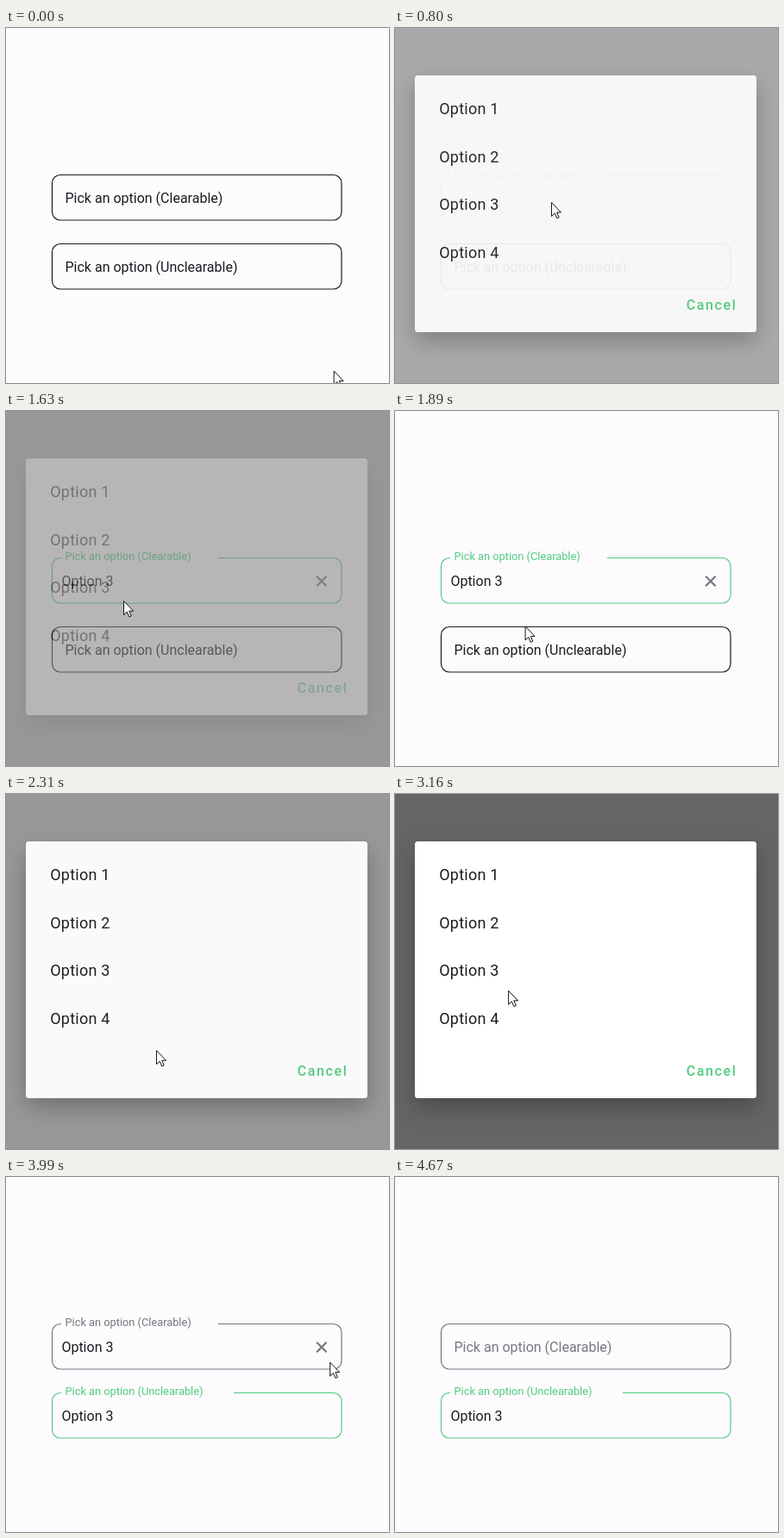
Recreate the animation shown at these times as an HTML page. Size 444x412 px, loop 5.4 s.

```html
<!DOCTYPE html>
<html lang="en">
<head>
<meta charset="utf-8">
<title>Select fields</title>
<style>
  html, body { margin: 0; width: 100%; height: 100%; overflow: hidden; background: #fefbff; }
  svg { display: block; width: 444px; height: 412px; font: 16px Roboto, sans-serif; fill: #1c1b1f; }
  .outline { fill: none; stroke-width: 1.2; }
  .gap { fill: #fefbff; }
  .cross { stroke: #79767c; stroke-width: 2.2; }
  .panel { fill: #fff; filter: drop-shadow(0 11px 13px rgba(0, 0, 0, .26)); }
  .option { font-size: 18px; letter-spacing: .25px; }
  .cancel { font-weight: 500; letter-spacing: 1.6px; fill: #50cc80; }
  .cursor { fill: #fff; stroke: #111; stroke-width: 1; }
</style>
</head>
<body>
<svg viewBox="0 0 444 412">
  <g id="fields"></g>
  <rect id="shade" width="444" height="412" fill="#000"/>
  <g id="dialog">
    <rect class="panel" x="23" y="55" width="396" height="298" rx="3.5"/>
    <text class="cancel" x="337.7" y="326.5">Cancel</text>
  </g>
  <path id="cursor" class="cursor" d="M.5 .5V16.5L4.2 13 6.8 18.8 9.2 17.7 6.7 12H11.5Z"/>
</svg>
<script>
const LOOP = 5400, FADE = 152;
const DARK = '#1c1b1f', GREEN = '#50cc80', GREY = '#79767c';
const OPEN1 = 717, PICK1 = 1580, OPEN2 = 2210, PICK2 = 3163, CLEAR = 4340, LEAVE = 4670;
const FOCUS1 = OPEN1 - 50, FOCUS2 = OPEN2 - 50;
const $ = id => document.getElementById(id);

function add(parent, tag, attrs, text = '') {
  const el = document.createElementNS('http://www.w3.org/2000/svg', tag);
  for (const k in attrs) el.setAttribute(k, attrs[k]);
  el.textContent = text;
  parent.append(el);
  return el;
}

function makeField(y, title, width) {
  const g = add($('fields'), 'g', { transform: `translate(0 ${y})` });
  return {
    outline: add(g, 'rect', { class: 'outline', x: 53.5, y: .5, width: 335.5, height: 52.5, rx: 9.5 }),
    gap: add(g, 'rect', { class: 'gap', x: 64, y: -2, width, height: 5 }),
    label: add(g, 'text', {}, title),
    value: add(g, 'text', { x: 64.4, y: 33 }, 'Option 3'),
    cross: add(g, 'path', { class: 'cross', d: 'M360.2 21.8l11.4 11.4m0-11.4l-11.4 11.4' })
  };
}

const first = makeField(170, 'Pick an option (Clearable)', 182);
const second = makeField(250, 'Pick an option (Unclearable)', 200);
for (let i = 0; i < 4; i++)
  add($('dialog'), 'text', { class: 'option', x: 51.2, y: 100 + i * 55.7 }, 'Option ' + (i + 1));

const ramp = (t, start, length) => Math.min(1, Math.max(0, (t - start) / length));
const smooth = p => p * p * (3 - 2 * p);
const float = (t, start) => smooth(ramp(t, start, FADE));
const show = (el, on) => el.setAttribute('visibility', on ? 'visible' : 'hidden');

function drawField(f, color, lift, filled, clearable) {
  f.outline.setAttribute('stroke', color);
  f.label.setAttribute('fill', color);
  f.label.setAttribute('transform', `translate(68.5 ${33 - 30 * lift}) scale(${1 - .2 * lift})`);
  show(f.gap, lift > 0);
  show(f.value, filled);
  show(f.cross, filled && clearable);
}

function drawDialog(t) {
  const [open, close] = t < FOCUS2 ? [OPEN1, PICK1] : [OPEN2, PICK2];
  const closing = t >= close;
  const p = closing ? 1 - ramp(t, close, FADE) : ramp(t, open, FADE);
  $('shade').setAttribute('opacity', .6 * p);
  $('dialog').setAttribute('opacity', closing ? p ** 3 : 1 - (1 - p) ** 3);
}

// turning points of the pointer: time, x, y
const turns = [
  [0, 380, 398], [600, 170, 191], [800, 181, 202], [1630, 136, 220],
  [2310, 174, 297], [2450, 173, 327], [3010, 89, 194], [3160, 130, 227],
  [3300, 286, 342], [3650, 388, 248], [4130, 370, 201], [CLEAR, 370, 201], [LEAVE, 391, 340]
];

function drawCursor(t) {
  show($('cursor'), t < LEAVE);
  if (t >= LEAVE) return;
  const i = turns.findIndex(k => k[0] > t);
  const [t0, x0, y0] = turns[i - 1], [t1, x1, y1] = turns[i];
  const p = ramp(t, t0, t1 - t0);
  $('cursor').setAttribute('transform', `translate(${x0 + (x1 - x0) * p} ${y0 + (y1 - y0) * p})`);
}

function draw(t) {
  drawField(first, t < FOCUS1 ? DARK : t < FOCUS2 ? GREEN : GREY,
    float(t, FOCUS1) - float(t, CLEAR), t >= PICK1 && t < CLEAR, true);
  drawField(second, t < FOCUS2 ? DARK : GREEN, float(t, FOCUS2), t >= PICK2, false);
  drawDialog(t);
  drawCursor(t);
}

const began = performance.now();
function tick() {
  draw((performance.now() - began) % LOOP);
  requestAnimationFrame(tick);
}
tick();
</script>
</body>
</html>
```
